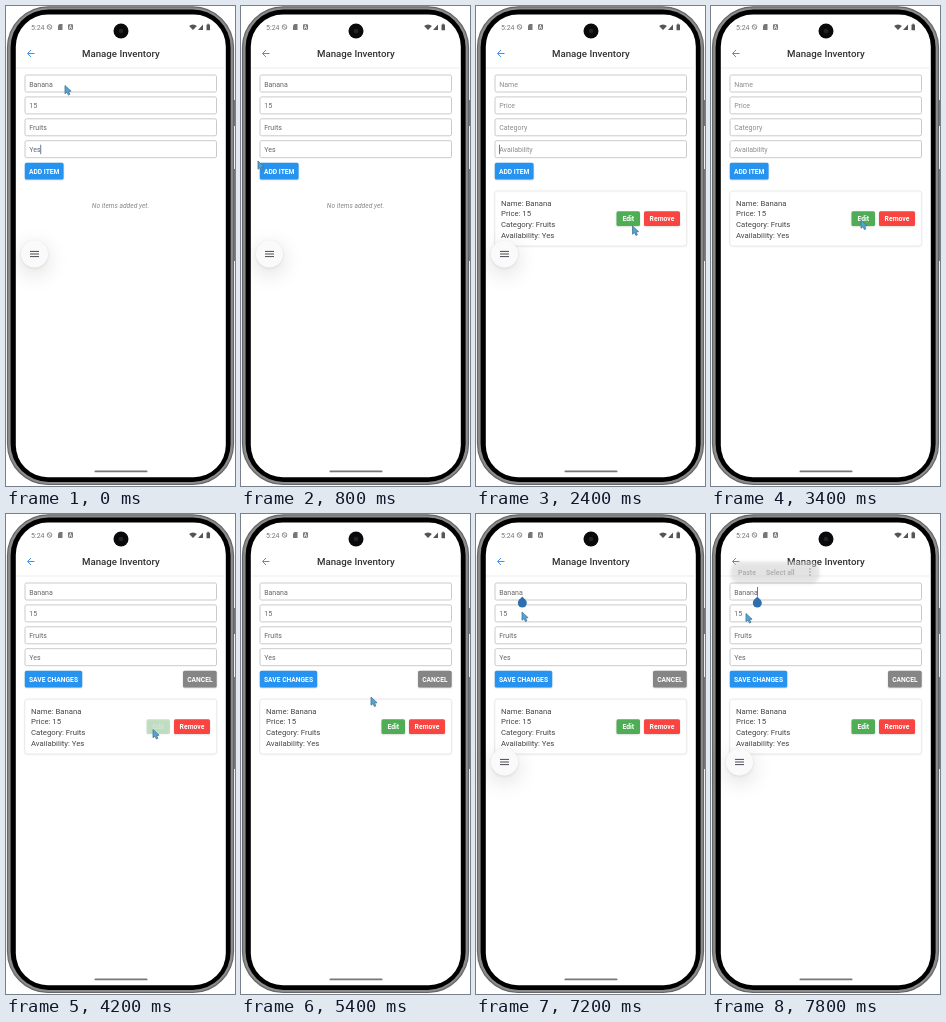
An HTML page with a canvas for the animation above (8 s loop, 229 px wide and 480 px high).

```html
<!DOCTYPE html>
<html lang="en">
<head>
<meta charset="utf-8">
<title>Manage Inventory</title>
<style>
html, body { margin: 0; width: 100%; height: 100%; overflow: hidden; background: #fff; }
canvas { display: block; width: 229px; height: 480px; }
</style>
</head>
<body>
<canvas id="stage"></canvas>
<script>
const W = 229, H = 480, LOOP = 8000, STEP = 200;
const FONT = 'Roboto, sans-serif';
const canvas = document.getElementById('stage');
const c = canvas.getContext('2d');
const dpr = window.devicePixelRatio || 1;
canvas.width = W * dpr;
canvas.height = H * dpr;

// Pointer keys: time, x, y
const PATH = [
  [0, 59, 79.5], [200, 58, 82], [600, 38, 125], [800, 17, 155], [1200, 28, 164],
  [1400, 28, 164], [1600, 48, 176], [2200, 155, 219], [2400, 156.5, 220],
  [2800, 190, 213], [3000, 188, 213], [3400, 150, 214], [3800, 147, 215.5],
  [4800, 147, 215.5], [5000, 146, 212], [5400, 130, 183], [5800, 65, 95],
  [6000, 55, 74], [6200, 46, 79], [6600, 47, 97], [7200, 46, 98], [7800, 35, 99.5]
];
const LABELS = ['Name', 'Price', 'Category', 'Availability'];
const VALUES = ['Banana', '15', 'Fruits', 'Yes'];
const BLUE = '#2793f0', GREY = '#858585';
const fieldY = i => 69 + i * 21.9;

function box(x, y, w, h, r, fill, stroke, line = 1) {
  c.beginPath();
  c.roundRect(x, y, w, h, r);
  if (fill) { c.fillStyle = fill; c.fill(); }
  if (stroke) { c.strokeStyle = stroke; c.lineWidth = line; c.stroke(); }
}

function dot(x, y, r, fill) {
  c.beginPath();
  c.arc(x, y, r, 0, Math.PI * 2);
  c.fillStyle = fill;
  c.fill();
}

function poly(points, fill, stroke, line = 1) {
  c.beginPath();
  points.forEach(([x, y], i) => i ? c.lineTo(x, y) : c.moveTo(x, y));
  if (fill) { c.closePath(); c.fillStyle = fill; c.fill(); }
  if (stroke) { c.strokeStyle = stroke; c.lineWidth = line; c.stroke(); }
}

function text(s, x, y, size, color, style = '400', align = 'left') {
  c.font = `${style} ${size}px ${FONT}`;
  c.fillStyle = color;
  c.textAlign = align;
  c.fillText(s, x, y);
}

function shadow(color, blur, dy) {
  c.shadowColor = color;
  c.shadowBlur = blur * dpr;
  c.shadowOffsetY = dy * dpr;
}

// Nested groups multiply their opacity.
function group(draw, alpha = 1) {
  c.save();
  c.globalAlpha *= alpha;
  draw();
  c.restore();
}

function button(label, x, y, w, h, color, size, weight, ink = '#fff') {
  group(() => {
    shadow('rgba(0,0,0,.2)', 2, .6);
    box(x, y, w, h, 1.6, color);
  });
  text(label, x + w / 2, y + h / 2 + size * .37, size, ink, weight, 'center');
}

function phone() {
  c.fillStyle = '#fff';
  c.fillRect(0, 0, W, H);
  box(226.5, 94, 3, 26, 1, '#777');
  box(226.5, 163, 3, 92, 1, '#777');
  box(1.5, .8, 226, 477.7, 41, '#8c8c8c', '#666', 1.2);
  box(4.6, 3.4, 220, 472.6, 38, '#000');
  box(9.8, 8.6, 210, 462.6, 32, '#fff');
  dot(115, 25, 7.5, '#0a0a0a');
  dot(115, 25, 2.3, '#1c2430');
  box(88.5, 464.5, 53, 1.8, .9, '#777');
}

function statusBar() {
  const ink = '#777';
  text('5:24', 25, 23.6, 7, ink);
  c.beginPath();
  c.arc(43.5, 21, 2.3, 0, Math.PI * 2);
  c.strokeStyle = ink;
  c.lineWidth = .8;
  c.stroke();
  poly([[42, 19.4], [45, 22.6]], null, ink, .8);
  poly([[52, 19.5], [53.5, 18], [56.5, 18], [56.5, 24], [52, 24]], ink);
  box(62, 18.3, 5, 5.5, 1, ink);
  text('A', 64.5, 23, 5, '#fff', '700', 'center');
  c.beginPath();
  c.moveTo(187, 24);
  c.arc(187, 24, 5.5, -Math.PI * .75, -Math.PI * .25);
  c.fillStyle = '#555';
  c.fill();
  poly([[192, 24], [197, 24], [197, 18.5]], '#555');
  box(200.5, 18.5, 3.5, 5.8, .6, '#555');
  box(201.4, 17.7, 1.7, 1, 0, '#555');
}

function header() {
  poly([[28.5, 47.5], [21.8, 47.5]], null, '#4a90e2', 1);
  poly([[25, 44], [21.5, 47.5], [25, 51]], null, '#4a90e2', 1);
  text('Manage Inventory', 114.8, 51.2, 9.7, '#333', '500', 'center');
  c.fillStyle = '#ededed';
  c.fillRect(10, 61.5, 209.6, 1);
}

function fields(filled) {
  LABELS.forEach((label, i) => {
    const y = fieldY(i);
    box(19, y, 191.5, 17, 1.6, '#fff', '#c4c4c4', .9);
    text(filled ? VALUES[i] : label, 23.2, y + 11.5, 7, filled ? '#666' : '#8c8c8c');
  });
}

function card(editAlpha) {
  group(() => {
    shadow('rgba(0,0,0,.05)', 2, .5);
    box(18.7, 185, 192, 55, 2.5, '#fff', '#e6e6e6', .8);
  });
  LABELS.forEach((label, i) =>
    text(`${label}: ${VALUES[i]}`, 25, 199.8 + i * 10.6, 7.75, '#444'));
  group(() => button('Edit', 140.5, 205.3, 23.5, 14.7, '#4fae55', 6.8, '700'), editAlpha);
  button('Remove', 168, 205.3, 36, 14.7, '#fa443f', 6.8, '700');
}

function menuButton(x, y, alpha) {
  group(() => {
    shadow('rgba(0,0,0,.15)', 22, 6);
    dot(x, y, 13.5, '#fafafa');
    shadow('rgba(0,0,0,.1)', 3, .8);
    dot(x, y, 13.5, '#fafafa');
    shadow('transparent', 0, 0);
    for (const dy of [-2.6, 0, 2.6]) box(x - 4.5, y + dy - .5, 9, 1, 0, '#474b55');
  }, alpha);
}

function caret(x, row) {
  c.fillStyle = '#4f6f92';
  c.fillRect(x, fieldY(row) + 4, .9, 9.5);
}

function dropHandle(x, y) {
  poly([[x, y - 6], [x + 3.6, y - 2], [x - 3.6, y - 2]], '#2e6fae');
  dot(x, y + .5, 4.5, '#2e6fae');
}

function popup(alpha) {
  group(() => {
    shadow('rgba(0,0,0,.25)', 4, 1);
    box(20, 47.5, 88, 20.5, 8, '#e4e4e4');
    shadow('transparent', 0, 0);
    text('Paste', 27, 60.5, 7, '#666', '500');
    text('Select all', 55, 60.5, 7, '#666', '500');
    for (const dy of [-3, 0, 3]) dot(99, 58 + dy, .8, '#444');
  }, alpha);
}

function pointer(t) {
  let i = 0;
  while (i < PATH.length - 2 && t >= PATH[i + 1][0]) i++;
  const [t0, x0, y0] = PATH[i], [t1, x1, y1] = PATH[i + 1];
  const k = Math.min(1, (t - t0) / (t1 - t0));
  const shape = [[0, 0], [0, 8.2], [1.9, 6.7], [3.5, 9.6], [4.9, 8.8], [3.5, 6], [6.1, 5.7], [0, 0]];
  group(() => {
    c.translate(x0 + (x1 - x0) * k, y0 + (y1 - y0) * k);
    c.lineJoin = 'round';
    poly(shape, '#4ba6da', '#4d7590', .8);
  });
}

function actions(editing, pressed) {
  const place = (label, x, w, color, ink) =>
    button(label, x, 156.8, w, 16.7, color, 6.7, '700', ink);
  if (editing) {
    place('SAVE CHANGES', 18.8, 57.4, BLUE);
    place('CANCEL', 177, 33.7, GREY);
  } else {
    place('ADD ITEM', 18.8, 38.8, pressed ? '#2b83d3' : BLUE, pressed ? '#cfe2f5' : '#fff');
  }
}

function draw(t) {
  const added = t >= 1400, editing = t >= 4000, refocused = t >= 6400;
  c.setTransform(dpr, 0, 0, dpr, 0, 0);
  phone();
  statusBar();
  header();
  fields(!added || editing);
  actions(editing, t >= 1200 && t < 1600);

  if (added) {
    const fade = .3 + Math.max(0, t - 4200) / 400 * .7;
    card(editing ? Math.min(1, fade) : 1);
  } else {
    text('No items added yet.', 114.5, 202, 6.65, '#888', 'italic 400', 'center');
  }

  if (t < 3400) {
    menuButton(28.5, 248, 1);
    const since = added ? t - 1400 : t;
    if (since % 1000 < 500) caret(added ? 23 : 34.3, 3);
  } else if (refocused) {
    const slide = Math.max(0, 1 - (t - 6400) / 400);
    menuButton(28.5 + slide * 9, 248 + slide * 8, t < 6600 ? .6 : 1);
    if ((t - 5700) % 1000 < 500) caret(46, 0);
    dropHandle(46.3, 88.5);
  }

  if (t >= 7800) popup(.45);
  pointer(t);
}

function tick(now) {
  const t = now % LOOP;
  draw(Math.floor(t / STEP) * STEP);
  requestAnimationFrame(tick);
}
requestAnimationFrame(tick);
</script>
</body>
</html>
```
